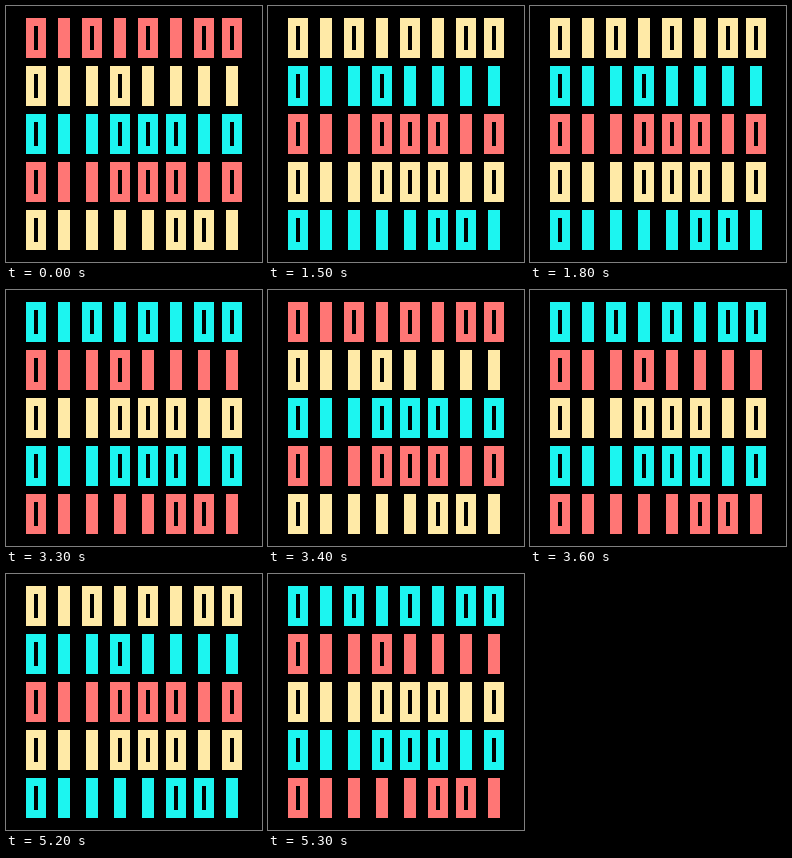
Animation of 256 by 256 pixels, one loop 5400 ms. Source, as an HTML page:

```html
<!DOCTYPE html>
<html lang="en">
<head>
<meta charset="utf-8">
<title>Binary rows</title>
<style>
  html, body { margin: 0; width: 100%; height: 100%; overflow: hidden; background: #000; }
  svg { display: block; width: 100vw; height: 100vh; }
</style>
</head>
<body>
<svg viewBox="0 0 256 256" shape-rendering="crispEdges"></svg>
<script>
const COLORS = ['#ff7675', '#ffeaa7', '#1cf5f0'];
const ROWS = ['01010100', '01101111', '01100010', '01100010', '01111001'];
const LOOP = 5400;
// Every step moves each row on to the next colour.
const STEPS = [0, 1500, 1600, 1700, 1800, 3300, 3400, 3500, 3600, 5100, 5200, 5300];

const zero = (x, y) => `M${x} ${y}h20v40h-20zM${x + 8} ${y + 8}v24h4v-24z`;
const one = (x, y) => `M${x + 4} ${y}h12v40h-12z`;

const svg = document.querySelector('svg');
const paths = ROWS.map((bits, row) => {
  const path = document.createElementNS(svg.namespaceURI, 'path');
  const glyph = (bit, col) => (bit === '0' ? zero : one)(20 + 28 * col, 12 + 48 * row);
  path.setAttribute('d', [...bits].map(glyph).join(''));
  path.setAttribute('fill-rule', 'evenodd');
  return svg.appendChild(path);
});

let shown = -1;
function draw(time) {
  const step = STEPS.filter(start => start <= time % LOOP).length - 1;
  if (step === shown) return;
  shown = step;
  paths.forEach((path, row) => path.setAttribute('fill', COLORS[(row + step) % 3]));
}

const start = performance.now();
function tick() {
  draw(performance.now() - start);
  requestAnimationFrame(tick);
}
tick();
</script>
</body>
</html>
```
